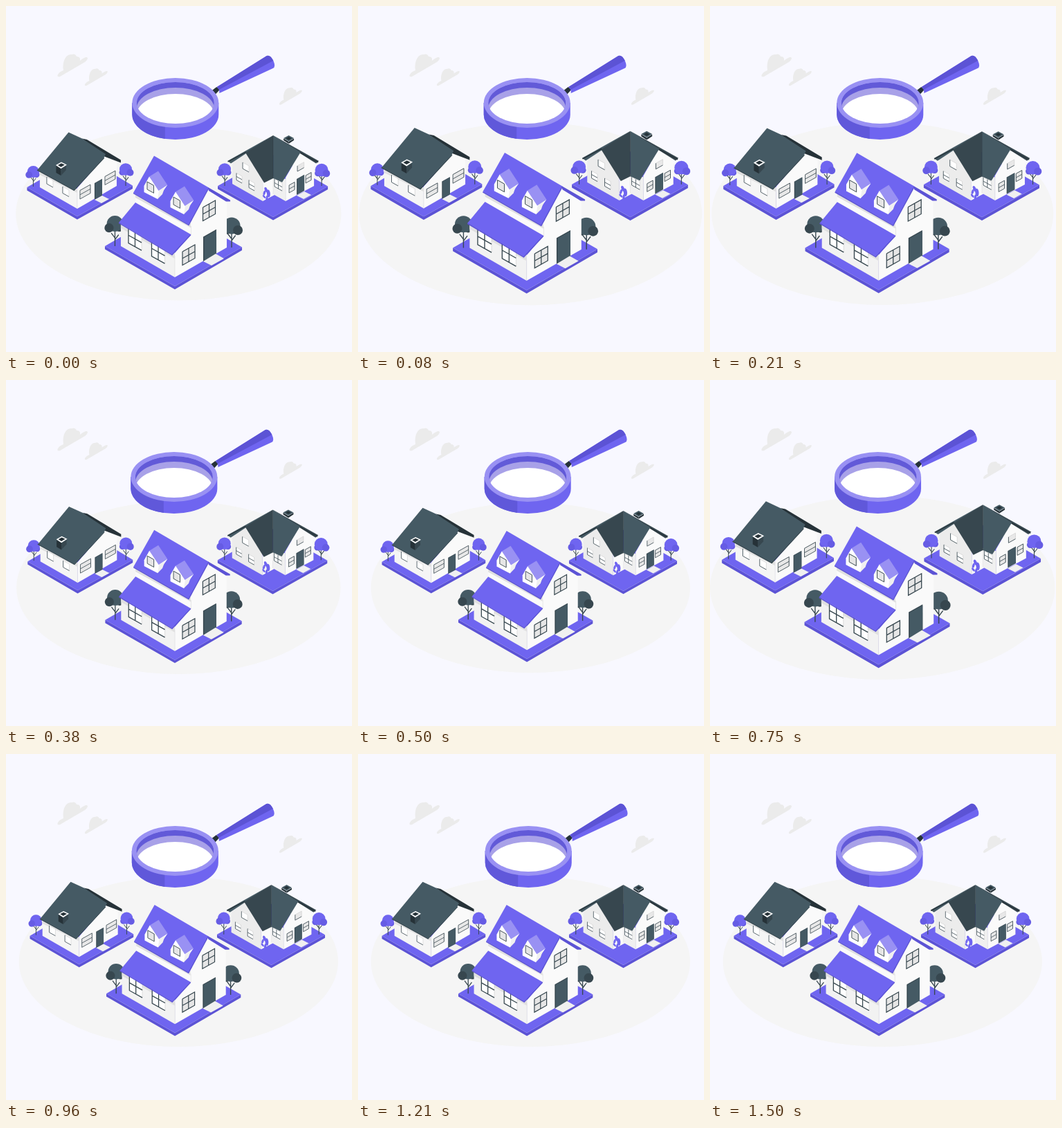
Animation of 500x500 px, one loop 1.54 s. Source, as an HTML page:

```html
<!DOCTYPE html>
<html lang="en">
<head>
<meta charset="utf-8">
<title>House search</title>
<style>
  html, body { margin: 0; width: 100%; height: 100%; overflow: hidden; background: #f8f8ff; }
  svg { display: block; width: 100vw; height: 100vh; }
</style>
</head>
<body>
<svg id="stage" viewBox="0 0 500 500"></svg>
<script>
const C = {
  main: '#6f65f0', deep: '#5c53d5', light: '#9991f3',
  slate: '#455a64', dark: '#37474f', ink: '#263238',
  lit: '#fafafa', wall: '#f0f0f0', shade: '#e0e0e0', floor: '#f5f5f5'
};
const SLOPE = 0.56;

const path = (d, fill, extra = '') => `<path d="${d}" fill="${fill}" ${extra}/>`;
const poly = (pts, fill) => path(`M${pts}Z`, fill);
const line = (d, color, w) => path(d, 'none', `stroke="${color}" stroke-width="${w}"`);
const disc = (x, y, rx, ry, fill, extra = '') =>
  `<ellipse cx="${x}" cy="${y}" rx="${rx}" ry="${ry}" fill="${fill}" ${extra}/>`;

// Upright panel on an isometric wall: dir 1 falls to the right, -1 rises.
const panel = (x, y, w, h, dir, fill) =>
  path(`M${x} ${y}l${w} ${dir * w * SLOPE}v${h}l${-w} ${-dir * w * SLOPE}Z`, fill);

function win(x, y, w, h, dir, { bars = '', weight = 0.8, glass = '#fff' } = {}) {
  const s = dir * w * SLOPE;
  let d = `M${x} ${y}v${h}l${w} ${s}`;
  if (bars.includes('o')) d += `v${-h}l${-w} ${-s}`;
  if (bars.includes('v')) d += `M${x + w / 2} ${y + s / 2}v${h}`;
  if (bars.includes('h')) d += `M${x} ${y + h / 2}l${w} ${s}`;
  return panel(x, y, w, h, dir, glass) + line(`M${x} ${y}l${w} ${s}v${h}`, '#c4c4c4', 0.5) + line(d, C.dark, weight);
}

function tree(x, y, base, r, side, top, low) {
  const trunk = `M${x} ${base}V${y}M${x} ${base - r}l${-r * 0.45} ${-r * 0.6}M${x} ${base - r * 0.8}l${r * 0.45} ${-r * 0.6}`;
  return line(trunk, C.dark, r / 9) +
    disc(x - side * r * 0.55, y + r * 0.5, r * 0.5, r * 0.48, low) +
    disc(x, y, r, r * 0.97, top) +
    disc(x + side * r * 0.72, y + r * 0.52, r * 0.56, r * 0.56, low);
}
const bush = (x, y, base, r, side) => tree(x, y, base, r, side, C.main, '#665ce4');
const oak = (x, y, base, r, side) => tree(x, y, base, r, side, C.slate, C.dark);

// Flat plot given by its left, front, right and back corners.
function lot(l, f, r, b, t) {
  const [fx, fy] = f, [lx, ly] = l, [rx, ry] = r;
  return poly(`${lx} ${ly}L${fx} ${fy}L${rx} ${ry}v${t}L${fx} ${fy + t}L${lx} ${ly + t}`, C.deep) +
    poly([l, f, r, b].map(p => p.join(' ')).join('L'), C.main);
}

const leftHouse = () =>
  lot([30.5, 262], [103, 304], [183, 259.5], [110, 216], 4.5) +
  bush(39.5, 239.5, 261, 8.7, -1) + bush(173, 236, 260, 9, 1) +
  poly('49 236L103 264V293L49 262', '#f5f5f5') +
  poly('49 240L98 267L103 264V270L49 244', C.shade) +
  poly('103 263L143 217L160 226V260L103 293', C.lit) +
  line('M103 265V293', C.shade, 0.6) +
  poly('110 191.5L117 193L166 222.5V226.5L141 217', C.ink) +
  poly('90.5 182.5L110 191.5L144 214L141 220.5L98.5 267L45 237.5', C.slate) +
  line('M142 219.5L98.5 266.5L45 237', C.dark, 1) +
  win(59, 247, 9, 10, 1) + win(82, 261, 9, 9.5, 1) +
  win(107, 266.5, 15, 12.5, -1, { bars: 'oh', glass: '#e8e8e8' }) +
  win(143, 246.5, 15, 12, -1, { bars: 'oh', glass: '#e8e8e8' }) +
  panel(128, 256, 11, 24, -1, C.dark) + panel(129, 256, 10, 23, -1, C.slate) +
  poly('128 280L139 274L149 279L138 285', C.wall) +
  poly('72.5 231L79.5 235V245L72.5 241', C.ink) +
  poly('79.5 235L87 231V237L79.5 245', C.dark) +
  poly('72 230L80 225.5L88 229.5L79.5 235', '#fff') +
  poly('75 230L80 227.3L85 229.6L79.5 232.7', C.ink);

const leaf = (x, y, a, r = 4.4) =>
  disc(0, 0, r * 0.45, r, C.main, `transform="translate(${x} ${y}) rotate(${a})"`);

const rightHouse = () =>
  lot([306, 260], [386, 305], [465, 260.5], [386, 215], 4.5) +
  bush(316, 236, 260, 9, -1) + bush(456, 237, 260, 9.5, 1) +
  poly('327 226L347 211L371 250V282L327 257', '#ececec') +
  poly('371 252L388 246V273L371 282', C.lit) +
  poly('386 246L404 250V282L386 272', C.wall) +
  poly('404 248L425 211L445 226V260L404 282', C.lit) +
  line('M371 256V281M404 249V281M386 249V272', C.shade, 0.6) +
  poly('320 224L386 187L347 213L325 227.5', C.slate) +
  poly('386 187L452 224L448 227.5L425 213', C.dark) +
  line('M320.5 225L347 211M425 212L451 226', C.ink, 1.2) +
  poly('346 212L386 187V249L373 255.5', C.dark) +
  poly('386 187L425.5 211.5L399 254.8L386 249', C.slate) +
  line('M386 188V249', C.ink, 0.5) +
  poly('401 191.5L408.5 196V199L401 194', C.ink) +
  poly('408.5 196L416 191.5V194L408.5 199', C.ink) +
  poly('401 191L408.5 187L416 191L408.5 195.5', C.slate) +
  poly('404.5 191.2L408.5 189L412.5 191.2L408.5 193.5', C.ink) +
  win(342, 226, 9, 9, 1) + win(333, 241.5, 8, 10, 1, { bars: 'h' }) +
  win(351, 251.5, 8, 11, 1, { bars: 'h' }) +
  win(388, 250, 11, 11, 1, { bars: 'vh' }) +
  win(421, 231, 9.5, 8, -1, { glass: '#e8e8e8' }) +
  win(409, 259, 8, 11, -1, { bars: 'oh', glass: '#e8e8e8' }) +
  win(433, 245, 8, 11, -1, { bars: 'oh', glass: '#e8e8e8' }) +
  panel(420, 250, 11, 23, -1, C.dark) + panel(421, 250, 10, 22, -1, C.slate) +
  poly('420 274L431 268L441 273L430 279', C.wall) +
  leaf(376, 266, -25) + leaf(379.3, 271, -5, 5.5) + leaf(373.3, 270, 15, 3.5) +
  leaf(373, 275.5, -40, 3) + leaf(377, 277, 10, 3.5);

const dormer = (dx, dy) => `<g transform="translate(${dx} ${dy})">` +
  poly('207 246.5L199.5 260V269L219 279L233 259', '#fff') +
  poly('219 279L221 267L229.5 262L226 272', C.wall) +
  poly('207 246.5L220 238.5L233.3 258.7L220.5 267', C.light) +
  win(204, 254, 9.5, 11, 1, { bars: 'o', weight: 0.9, glass: '#e6e6e6' }) + '</g>';

const pane = { bars: 'vh', weight: 1.3 };
const litPane = { bars: 'ovh', weight: 1.2, glass: '#e6e6e6' };

const frontHouse = () =>
  lot([143, 347], [244, 405], [341, 348.5], [240, 291], 4.5) +
  oak(157.5, 314.5, 347, 11.8, -1) + oak(326, 317.5, 349, 12.5, 1) +
  poly('187 270L268 312V334L187 288', C.lit) +
  poly('187 271L265 316L268 312V321L187 277', C.shade) +
  poly('166 312L244 355V392L166 347', '#f2f2f2') +
  poly('166 315L240 359L244 356V365L166 321', C.shade) +
  poly('244 357L267 330V312L293 264L319 282V349L244 392', C.lit) +
  line('M244 361V391M267.5 318V331', C.shade, 0.7) +
  win(177, 320, 19, 22.5, 1, pane) + win(210.5, 339, 19, 22.5, 1, pane) +
  poly('163 313L187 284L267 330L240 359', C.main) +
  line('M163 313.5L240 359.5L267 330.5', C.deep, 1.4) +
  poly('292 262L324 280.5V282.5L318 282.5L293 267', C.deep) +
  poly('214 216.5L293 262.5L264 316L184 270', C.main) +
  line('M184 270.5L264 316.5L293 263', C.deep, 1.4) +
  dormer(0, 0) + dormer(38, 22) +
  win(284.5, 291, 18, 19.5, -1, litPane) + win(255, 355, 18, 19.5, -1, litPane) +
  panel(285, 333.5, 19, 36, -1, C.dark) + panel(286.5, 334, 17.5, 34, -1, C.slate) +
  poly('285 369L303 358L315 365L297 375', C.wall);

const cloud = (x, y, s) => path(
  'M1 30Q3 26 9 24C7 12 12 0 21 1Q26-1 28 4Q34 4 33 10Q42 3 44 6Q44 9 40 12L4 33Q-1 34 1 30Z',
  '#ebebeb', `transform="translate(${x} ${y}) scale(${s})"`);

const glass = () =>
  poly('298 122L304.5 117L309 121L303 127.5', C.ink) +
  path('M305 117L377 72Q382 70 386.5 79Q390.5 88 386 90L308.5 126Q309 120 305 117Z', C.main) +
  path('M305 117L377 72Q382 70 386.5 79L308 121Z', C.deep) +
  path('M182.5 140V157A62.5 36 0 0 0 307.5 157V140Z', C.main) +
  path('M182.5 140V157A62.5 36 0 0 0 230 192V170Z', '#6058da') +
  disc(245, 140, 62.5, 36, C.light) +
  '<clipPath id="hole"><ellipse cx="245" cy="140" rx="56" ry="30"/></clipPath><g clip-path="url(#hole)">' +
  disc(245, 140, 56, 30, '#625ad8') +
  disc(245, 148, 56, 30, '#a8a1e8') +
  disc(245, 157, 56, 30, '#fff') + '</g>';

document.getElementById('stage').innerHTML =
  cloud(74, 69, 1) + cloud(113.5, 90, 0.76) + cloud(394.5, 117.5, 0.76) +
  '<g id="town">' + disc(249.3, 300, 235, 125.5, C.floor) +
  leftHouse() + rightHouse() + frontHouse() + '</g>' +
  '<g id="lens">' + glass() + '</g>';

const LOOP = 1540, TICK = 1000 / 24, SPAN = 1500, LEAD = 29;
const REST = 0.9815; // the town is drawn slightly larger than its resting size
const beat = [[0, 1], [.1, 1.1], [.3, 1], [.4, 1], [.5, 1.1], [.6, 1], [1, 1]];
const shake = [0, -1, 2, -4, 4, -4, 4, -4, 2, -1, 0].map((x, i) => [i / 10, x]);

function at(keys, p) {
  const i = Math.max(1, keys.findIndex(k => k[0] >= p));
  const [p0, v0] = keys[i - 1], [p1, v1] = keys[i];
  return v0 + (v1 - v0) * (p - p0) / (p1 - p0);
}

const town = document.getElementById('town');
const lens = document.getElementById('lens');

function draw() {
  const t = performance.now() % LOOP;
  const step = Math.floor((t + 5) / TICK); // motion holds at 24 steps a second
  const p = Math.min(1, (step * TICK + LEAD) / SPAN);
  town.setAttribute('transform', `translate(250 300) scale(${REST * at(beat, p)}) translate(-250 -300)`);
  lens.setAttribute('transform', `translate(${at(shake, p)} 0)`);
  requestAnimationFrame(draw);
}
draw();
</script>
</body>
</html>
```
